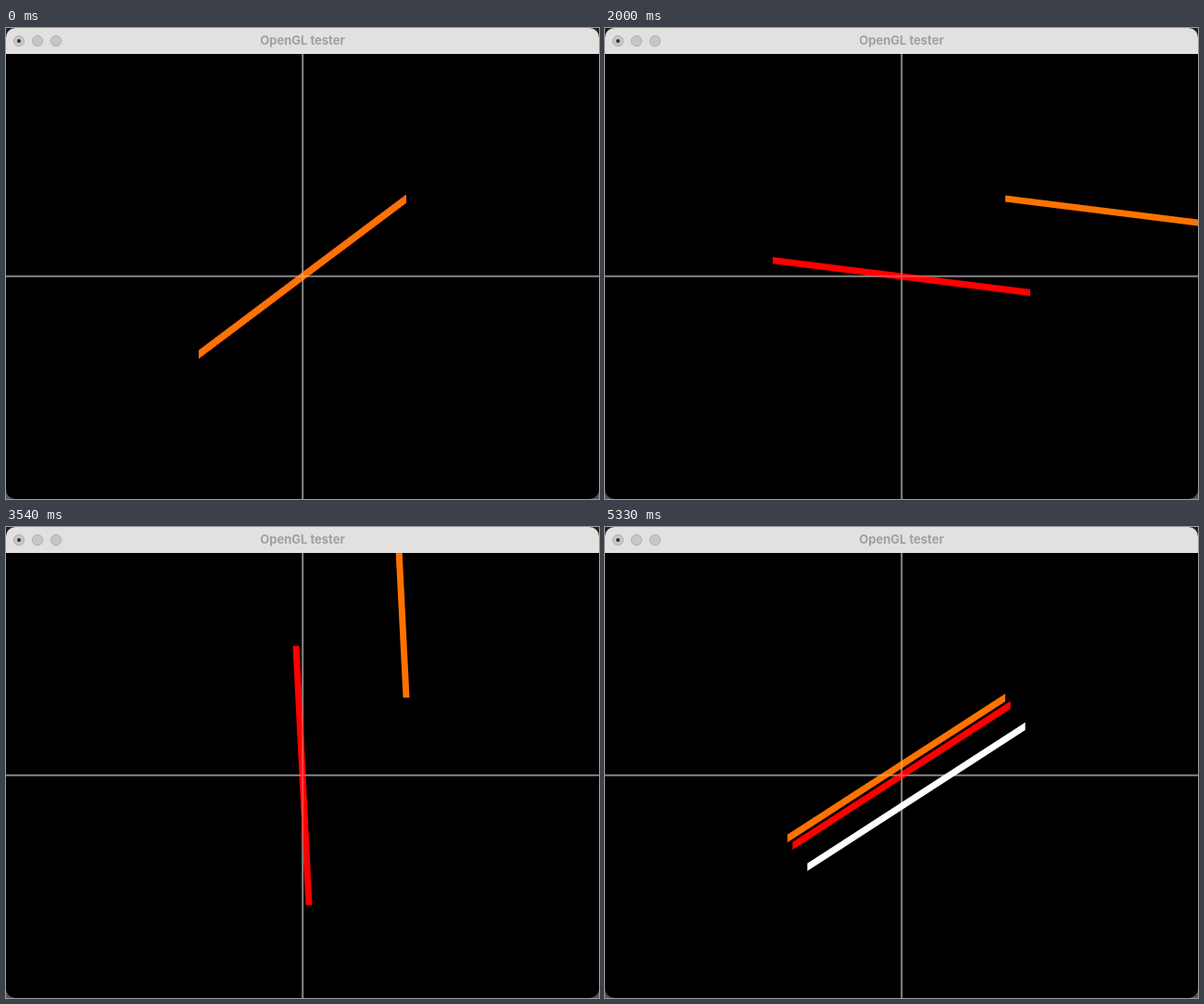
An HTML page for the animation above (5.45 s loop, 640x508 px).

```html
<!DOCTYPE html>
<html lang="en">
<head>
<meta charset="utf-8">
<title>OpenGL tester</title>
<style>
  html, body { margin: 0; width: 100%; height: 100%; overflow: hidden; background: #000; }
  svg { display: block; width: 640px; height: 508px; }
  text { font: 700 13px Inter, "Open Sans", sans-serif; fill: #a1a09f; text-anchor: middle; }
  .button { fill: #c8c6c5; stroke: #b3b1b0; }
  .axis { stroke: #858585; stroke-width: 2; }
  .glint { opacity: .25; stroke: #fff; }
</style>
</head>
<body>
<svg viewBox="0 0 640 508">
  <defs>
    <clipPath id="window"><rect width="640" height="508" rx="10"/></clipPath>
    <clipPath id="view"><rect y="28" width="640" height="480"/></clipPath>
    <path id="axes" d="M0 267.8H640M320.2 28V508"/>
  </defs>
  <rect width="640" height="254" fill="#222"/>
  <rect y="254" width="640" height="254" fill="#555"/>
  <g clip-path="url(#window)">
    <rect width="640" height="508"/>
    <rect width="640" height="28" fill="#e2e1e0"/>
    <circle class="button" cx="14" cy="14" r="5.7"/>
    <circle class="button" cx="34" cy="14" r="5.7"/>
    <circle class="button" cx="54" cy="14" r="5.7"/>
    <circle cx="14" cy="14" r="2" fill="#333"/>
    <text x="320" y="18.3">OpenGL tester</text>
    <g clip-path="url(#view)">
      <use href="#axes" class="axis"/>
      <g id="lines"></g>
      <path class="axis glint" d="M0 267.8H640M320.2 28V508" clip-path="url(#strokes)"/>
    </g>
  </g>
  <clipPath id="strokes"></clipPath>
</svg>
<script>
const LOOP = 5450, FPS = 24, DEGREES_PER_TICK = 4;
const CENTER = [320, 268], HALF = [112, -84], WIDTH = 7;

// The same segment turns about the window corner, its middle and its end.
const lines = [
  { color: '#fff', pivot: [0, 508] },
  { color: '#f00', pivot: CENTER },
  { color: '#ff7200', pivot: [432, 184] }
];
const make = (parent, color) => {
  const shape = document.createElementNS('http://www.w3.org/2000/svg', 'polygon');
  shape.setAttribute('fill', color);
  return document.getElementById(parent).appendChild(shape);
};
for (const line of lines) {
  line.shapes = [make('lines', line.color), make('strokes', line.color)];
}

// Uneven redraw rhythm: [redraw count, video frame], interpolated between.
const rhythm = [[0, 0], [9, 13], [12, 18], [19, 29], [24, 37], [26, 40], [35, 55],
  [36, 56], [39, 61], [40, 63], [45, 71], [53, 83], [55, 87], [62, 98], [67, 104],
  [72, 114], [80, 127], [81, 128]];
const redrawTimes = [0];
for (let k = 1; k < rhythm.length; k++) {
  const [i0, f0] = rhythm[k - 1], [i1, f1] = rhythm[k];
  for (let i = i0 + 1; i <= i1; i++) {
    const frame = Math.round(f0 + (f1 - f0) * (i - i0) / (i1 - i0));
    redrawTimes.push(Math.floor(frame * 100 / FPS) * 10);
  }
}

function tickAt(time) {
  const redraw = redrawTimes.findLastIndex(start => start <= time);
  return Math.floor(0.9 + 1.09 * redraw);
}

function rotate([x, y], [px, py], angle) {
  const c = Math.cos(angle), s = Math.sin(angle), dx = x - px, dy = y - py;
  return [px + dx * c + dy * s, py - dx * s + dy * c];
}

// Wide lines have ends cut along the nearest screen axis.
function outline([x0, y0], [x1, y1]) {
  const dx = x1 - x0, dy = y1 - y0;
  const steep = Math.abs(dy) > Math.abs(dx);
  const reach = WIDTH / 2 * Math.hypot(dx, dy) / Math.max(Math.abs(dx), Math.abs(dy));
  const ox = steep ? reach : 0, oy = steep ? 0 : reach;
  return [[x0 - ox, y0 - oy], [x1 - ox, y1 - oy], [x1 + ox, y1 + oy], [x0 + ox, y0 + oy]].join(' ');
}

const start = performance.now();
function draw() {
  const time = (performance.now() - start) % LOOP;
  const angle = tickAt(time) * DEGREES_PER_TICK * Math.PI / 180;
  for (const { pivot, shapes } of lines) {
    const [a, b] = [-1, 1].map(side =>
      rotate([CENTER[0] + side * HALF[0], CENTER[1] + side * HALF[1]], pivot, angle));
    const points = outline(a, b);
    shapes.forEach(shape => shape.setAttribute('points', points));
  }
  requestAnimationFrame(draw);
}
draw();
</script>
</body>
</html>
```
